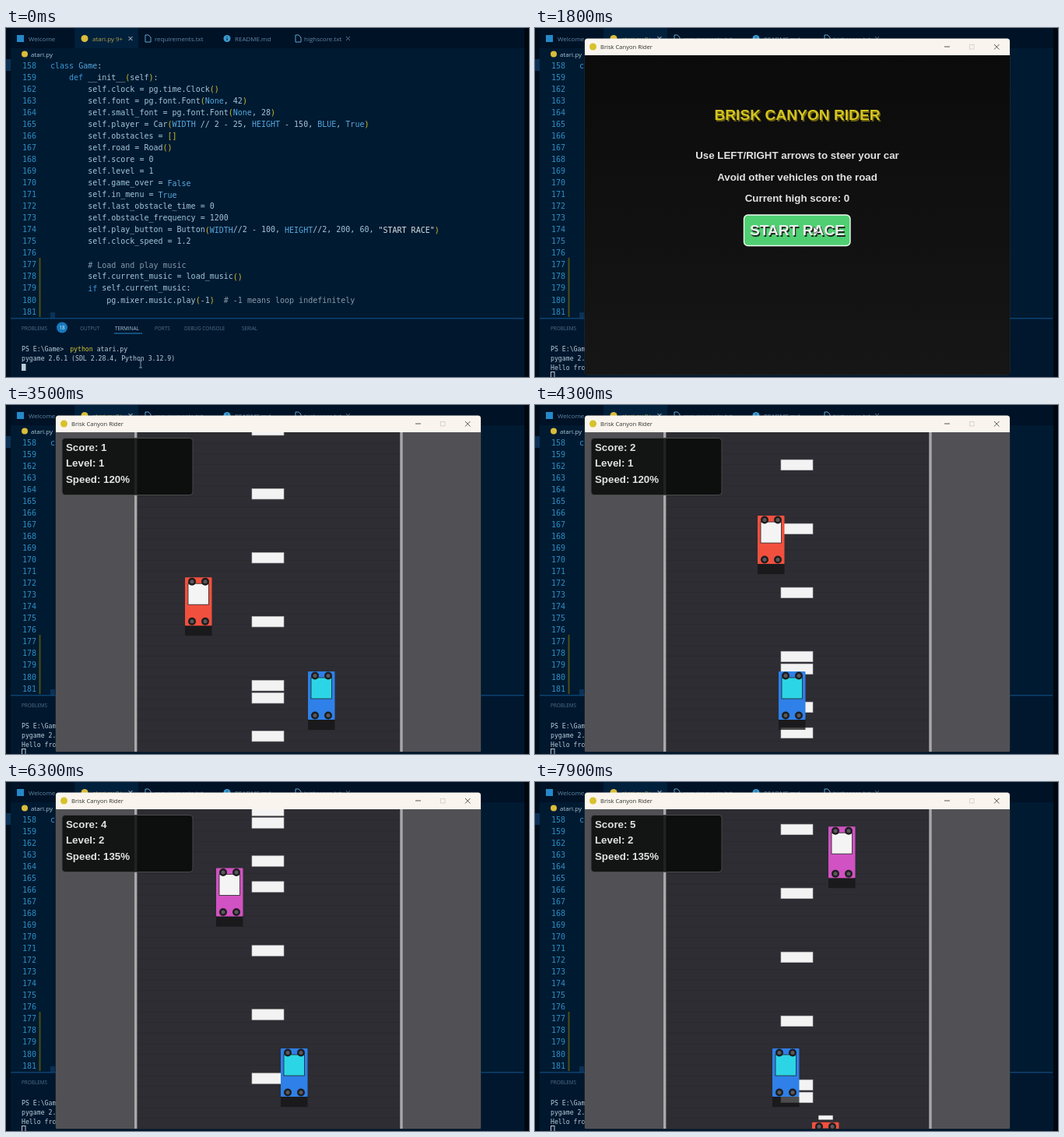
Write an HTML page that moves like this. It is 672 by 448 pixels and loops after 8 s.

```html
<!DOCTYPE html>
<html lang="en">
<head>
<meta charset="utf-8">
<title>Brisk Canyon Rider</title>
<style>
html, body { margin: 0; width: 100%; height: 100%; overflow: hidden; background: #001a30; }
svg { display: block; width: 672px; height: 448px; }
text, tspan { white-space: pre; dominant-baseline: central; }
.ui { font-family: "Open Sans", "Noto Sans", sans-serif; }
.tabs { font-size: 8px; fill: #6088a5; }
.panel { font-size: 6.4px; fill: #4f7089; }
.code { font: 10px "DejaVu Sans Mono", monospace; fill: #a3c6d8; }
.term { font: 8.2px "DejaVu Sans Mono", monospace; fill: #b9cdd8; }
.num { fill: #2b90c6; }
.kw { fill: #3d97d6; }
.name { fill: #57a8de; }
.paren { fill: #d0bd2c; }
.str { fill: #d5e2e6; }
.note { fill: #8699a8; }
.game { font: bold 13.3px "Liberation Sans", Arial, sans-serif; fill: #e2e2e2; }
.mid { text-anchor: middle; }
.big { font-size: 19.2px; }
</style>
</head>
<body>
<svg viewBox="0 0 672 448" xmlns="http://www.w3.org/2000/svg">
  <defs>
    <clipPath id="client"><rect x="64" y="35" width="546" height="410"/></clipPath>
    <linearGradient id="night" x2="0" y2="1">
      <stop stop-color="#0b0b0b"/><stop offset="1" stop-color="#161616"/>
    </linearGradient>
    <pattern id="grain" width="20" height="13.66" y="35" patternUnits="userSpaceOnUse">
      <path d="M0 .5H20" stroke="#28282d" stroke-width=".8"/>
    </pattern>
  </defs>

  <!-- editor -->
  <rect width="672" height="448" fill="#001a31"/>
  <rect width="672" height="26" fill="#001226"/>
  <rect x="88" width="82" height="26" fill="#00203c"/>
  <rect y="373" width="672" height="75" fill="#00172e"/>
  <rect width="6" height="448" fill="#000e1c"/>
  <rect y="40" width="6" height="15" fill="#0a3155"/>
  <rect x="666" width="6" height="448" fill="#000710"/>
  <path d="M6 372.8H665" stroke="#0b4270" stroke-width="1.6"/>
  <path d="M43.5 295V371" stroke="#4c4e12" stroke-width="2"/>
  <rect x="57" y="365" width="6" height="7" fill="#0a3158"/>
  <g class="ui tabs">
    <rect x="14" y="9" width="9" height="9" fill="#2489ca"/>
    <text x="29" y="13">Welcome</text>
    <circle cx="101" cy="13.5" r="4.5" fill="#d9bd3a"/>
    <text x="111" y="13" fill="#b5a348">atari.py 9+</text>
    <path d="M157.5 11l5 5m0-5l-5 5" stroke="#c6d6e0"/>
    <text x="191" y="13">requirements.txt</text>
    <circle cx="284" cy="13.5" r="4.5" fill="#3b9bd0"/>
    <path d="M284 11v1m0 1v3" stroke="#001226"/>
    <text x="294" y="13">README.md</text>
    <text x="383" y="13">highscore.txt</text>
    <path d="M437 11l5 5m0-5l-5 5" stroke="#6f93ad" stroke-width=".8"/>
    <g fill="none" stroke="#5aa6cf"><path id="page" d="M179 9h4l3 3v6h-7z"/><use href="#page" x="193"/></g>
    <circle cx="24" cy="33.5" r="4" fill="#d9bd3a"/>
    <text x="32" y="33" fill="#a9c4d6">atari.py</text>
  </g>
  <g id="code" class="code"></g>
  <g class="ui panel">
    <text x="20" y="385">PROBLEMS</text>
    <circle cx="72" cy="384.5" r="7" fill="#1579bd"/>
    <text x="72" y="384.5" class="mid" fill="#d9ecf7">18</text>
    <text x="95" y="385">OUTPUT</text>
    <text x="140" y="385" fill="#a9c4d6">TERMINAL</text>
    <path d="M139 392H175" stroke="#2489ca"/>
    <text x="191" y="385">PORTS</text>
    <text x="229" y="385">DEBUG CONSOLE</text>
    <text x="303" y="385">SERIAL</text>
  </g>
  <g class="term">
    <text x="20" y="412">PS E:\Game&gt; <tspan dx="3" fill="#d5c637">python</tspan> atari.py</text>
    <text x="20" y="424">pygame 2.6.1 (SDL 2.28.4, Python 3.12.9)</text>
    <text id="hello" x="20" y="436">Hello from the pygame community. https://www.pygame.org/contribute.html</text>
    <rect id="caret" x="20.5" width="4.5" height="8" stroke="#b9cdd8"/>
  </g>
  <path id="beam" d="M171 427h4m-2 0v9m-2 0h4" fill="none" stroke="#7f9aab"/>

  <!-- game window -->
  <g id="win">
    <rect x="63.500" y="14" width="547" height="431.500" rx="3" fill="#2a2e33"/>
    <path d="M64 35V17q0-3.500 3.500-3.500H606.500q3.500 0 3.500 3.500V35z" fill="#f9f5ee"/>
    <circle cx="74.5" cy="24" r="4.5" fill="#d8c12c"/>
    <text class="ui" x="84" y="24" font-size="7.6" fill="#33312e">Brisk Canyon Rider</text>
    <g fill="none" stroke="#44423f" stroke-width=".9">
      <path d="M526 24h7M590 21l6.5 6.500m0-6.500l-6.500 6.500"/>
      <rect x="558.5" y="21.5" width="5.5" height="5.5" stroke="#d5d1ca"/>
    </g>
    <g id="menu" class="game mid" clip-path="url(#client)">
      <rect x="64" y="35" width="546" height="410" fill="url(#night)"/>
      <g class="big">
        <text x="338.4" y="113" fill="#6a5f10">BRISK CANYON RIDER</text>
        <text x="337" y="111.6" fill="#d3c41f">BRISK CANYON RIDER</text>
      </g>
      <text x="337" y="163.8">Use LEFT/RIGHT arrows to steer your car</text>
      <text x="337" y="191.2">Avoid other vehicles on the road</text>
      <text x="337" y="218.2">Current high score: 0</text>
      <rect id="button" x="268.5" y="240" width="136.5" height="39.5" rx="5" stroke="#eefaf0" stroke-width="1.4"/>
      <g class="big">
        <text x="338.4" y="261" fill="#1b2a1e">START RACE</text>
        <text x="337" y="259.6" fill="#ececec">START RACE</text>
      </g>
      <path id="arrow" d="M0 0v9l2.200-2 1.600 3.500 1.300-.6-1.600-3.400h3z" fill="#fff" stroke="#222" stroke-width=".6"/>
    </g>
    <g id="race" clip-path="url(#client)">
      <rect x="64" y="35" width="546" height="410" fill="#515155"/>
      <rect x="167" y="35" width="341" height="410" fill="#2d2d33"/>
      <rect x="167" y="35" width="341" height="410" fill="url(#grain)"/>
      <path d="M166.7 35V445M508 35V445" stroke="#a9a9ab" stroke-width="3.4"/>
      <g id="dashes"></g>
      <g id="cars"></g>
      <g class="game">
        <rect x="72" y="42.5" width="168" height="73" rx="4" fill="#060a08" fill-opacity=".84" stroke="#47494a"/>
        <text id="score" x="77" y="54.4"></text>
        <text id="level" x="77" y="74.9"></text>
        <text id="speed" x="77" y="95.4"></text>
      </g>
    </g>
  </g>
</svg>
<script>
const LOOP = 8000, STEP = 100, OPEN = 600, START = 1885;
const $ = id => document.getElementById(id);

function add(parent, tag, attrs, text) {
  const el = document.createElementNS("http://www.w3.org/2000/svg", tag);
  for (const k in attrs) el.setAttribute(k, attrs[k]);
  if (text) el.textContent = text;
  return parent.appendChild(el);
}
const place = (el, x, y) => el.setAttribute("transform", `translate(${x} ${y})`);
const show = (el, on) => { el.style.display = on ? "" : "none"; };

// Piecewise linear value through [time, value] points
function along(points, t) {
  let i = 1;
  while (i < points.length - 1 && t > points[i][0]) i++;
  const [t0, a] = points[i - 1], [t1, b] = points[i];
  return a + (b - a) * Math.min(1, Math.max(0, (t - t0) / (t1 - t0)));
}

const source = `class Game:
    def __init__(self):
        self.clock = pg.time.Clock()
        self.font = pg.font.Font(None, 42)
        self.small_font = pg.font.Font(None, 28)
        self.player = Car(WIDTH // 2 - 25, HEIGHT - 150, BLUE, True)
        self.obstacles = []
        self.road = Road()
        self.score = 0
        self.level = 1
        self.game_over = False
        self.in_menu = True
        self.last_obstacle_time = 0
        self.obstacle_frequency = 1200
        self.play_button = Button(WIDTH//2 - 100, HEIGHT//2, 200, 60, "START RACE")
        self.clock_speed = 1.2

        # Load and play music
        self.current_music = load_music()
        if self.current_music:
            pg.mixer.music.play(-1)  # -1 means loop indefinitely
`;
const syntax = /(?<note>#.*)|(?<str>"[^"]*")|\b(?<kw>class|def|if)\b|\b(?<name>None|True|False|WIDTH|HEIGHT|BLUE|Game)\b|(?<paren>[()[\]])/g;

source.split("\n").forEach((line, i) => {
  const y = 48 + i * 15.05, body = line.trimStart();
  add($("code"), "text", { x: 21, y, class: "num" }, String(i < 2 ? 158 + i : 160 + i));
  const row = add($("code"), "text", { x: 57 + (line.length - body.length) * 6.02, y });
  let end = 0;
  for (const m of body.matchAll(syntax)) {
    row.append(body.slice(end, m.index));
    add(row, "tspan", { class: Object.keys(m.groups).find(k => m.groups[k]) }, m[0]);
    end = m.index + m[0].length;
  }
  row.append(body.slice(end));
});

// Lane dashes: uneven offsets that wrap as one ring
const RING = 426;
const dashes = [-49, 0, 33, 115, 197, 279, 361].map(offset => ({
  offset,
  el: add($("dashes"), "rect", { x: 316, width: 41, height: 13.5, fill: "#f3f3f3", stroke: "#b5b5b8", "stroke-width": .6 })
}));
const roadPath = [[1800, -406], [2800, 85], [4300, 814], [5400, 1363], [7100, 2199], [7900, 2584]];

// Window panes are [top, height] inside the car
const models = {
  sedan: { h: 62, panes: [[8, 27]] },
  compact: { h: 55, panes: [[8, 27]] },
  wagon: { h: 66, panes: [[9, 15], [27, 17]] },
  van: { h: 66, panes: [[8, 27]] },
  sport: { h: 55.5, panes: [[8, 16]], wing: true }
};
function car(model, paint, glass = "#f4f4f4") {
  const { h, panes, wing } = models[model], g = add($("cars"), "g", {});
  add(g, "rect", { y: h, width: 34.5, height: 13, fill: "#141416", "fill-opacity": .75 });
  add(g, "rect", { width: 34.5, height: h, rx: 1, fill: paint });
  for (const [y, height] of panes)
    add(g, "rect", { x: 4, y, width: 26.5, height, fill: glass, stroke: "#222", "stroke-width": .8 });
  if (wing) add(g, "rect", { x: 8, y: -9, width: 19, height: 6, fill: "#f4f4f4", stroke: "#333", "stroke-width": .6 });
  for (const cx of [9, 26]) for (const cy of [5.5, h - 5.5]) {
    add(g, "circle", { cx, cy, r: 5, fill: "#1d1d1f" });
    add(g, "circle", { cx, cy, r: 2.5, fill: "#5a5a5d" });
  }
  return g;
}

const RED = "#f2503e", PINK = "#d152c2", FALL = .41, TOP = -33;
const traffic = [
  [1885, 312, "compact", RED],
  [2880, 230, "sedan", RED],
  [3873, 286, "sedan", RED],
  [4976, 395, "wagon", RED],
  [5950, 270, "sedan", PINK],
  [6754, 356, "sport", RED],
  [7680, 377, "van", PINK]
].map(([born, x, model, paint]) => ({ born, x, el: car(model, paint) }));

const player = car("sedan", "#2f80e8", "#2cd5e6");
const steering = [[2300, 320], [2520, 388], [3750, 388], [3980, 313], [4400, 313], [4530, 353],
  [6300, 353], [6400, 380], [7150, 380], [7390, 305]];

function drawMenu(t) {
  const p = along([[800, 0], [1500, 1]], t), ease = p * p * (3 - 2 * p);
  place($("arrow"), 173 + 185 * ease, 432 - 177 * ease);
  $("button").setAttribute("fill", p > .9 ? "#4fcf72" : "#36b259");
}

function drawRace(t) {
  const shift = along(roadPath, t);
  for (const { offset, el } of dashes) {
    const p = (shift + offset - 28) % RING;
    el.setAttribute("y", 21.2 + (p + RING) % RING);
  }
  let score = 0;
  for (const { born, x, el } of traffic) {
    const y = TOP + (t - born) * FALL;
    show(el, t >= born && y < 460);
    place(el, x, y);
    if (y > 445) score++;
  }
  place(player, along(steering, t), 342);
  const level = score < 4 ? 1 : 2;
  $("score").textContent = `Score: ${score}`;
  $("level").textContent = `Level: ${level}`;
  $("speed").textContent = `Speed: ${105 + level * 15}%`;
}

function frame(now) {
  const t = Math.floor(now % LOOP / STEP) * STEP;
  const greeted = t >= 200, open = t >= OPEN, racing = t >= START;
  show($("hello"), greeted);
  // The terminal caret is solid only while the terminal has focus
  $("caret").setAttribute("y", greeted ? 441.5 : 431.5);
  $("caret").setAttribute("fill", open ? "none" : "#b9cdd8");
  show($("beam"), !open);
  show($("win"), open);
  $("win").setAttribute("opacity", t === OPEN ? .7 : 1);
  show($("menu"), !racing);
  show($("race"), racing);
  if (racing) drawRace(t); else drawMenu(t);
  requestAnimationFrame(() => frame(performance.now() - begin));
}
const begin = performance.now();
frame(0);
</script>
</body>
</html>
```
